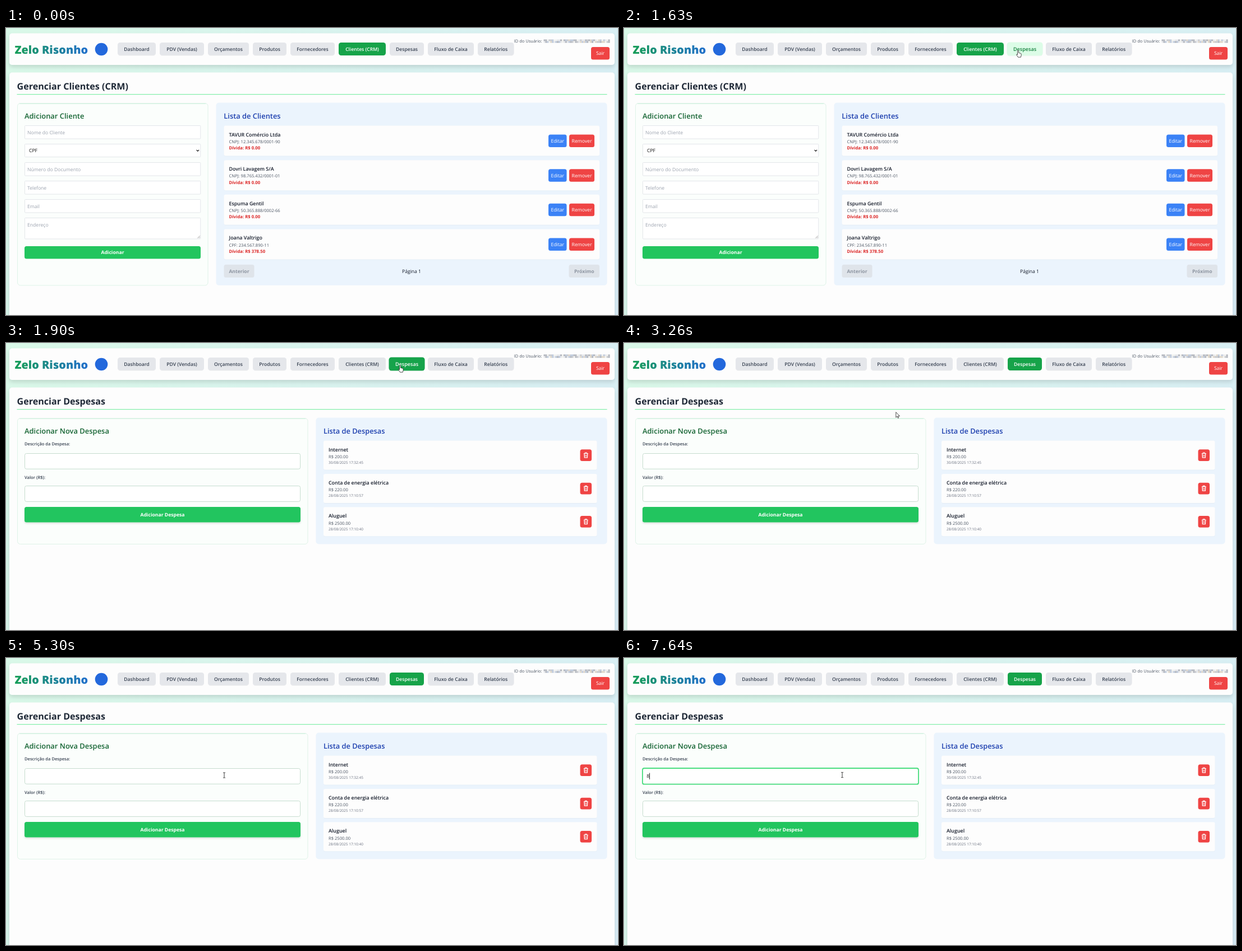
An HTML page for the animation above (8000 ms loop, 1091 by 513 pixels).

```html
<!DOCTYPE html>
<html lang="pt-BR">
<head>
<meta charset="utf-8">
<title>Gerenciar Despesas</title>
<style>
  html, body { margin: 0; width: 100%; height: 100%; overflow: hidden; }
  svg { display: block; width: 1091px; height: 513px; }
  text { font-family: "Open Sans", "Noto Sans", sans-serif; text-rendering: geometricPrecision; white-space: pre; }
</style>
</head>
<body>
<svg id="stage" viewBox="0 0 1091 513" xmlns="http://www.w3.org/2000/svg"></svg>
<script>
const LOOP = 8000;
const GRAY = [229, 231, 235], GREEN = [22, 163, 74], MINT = [220, 252, 231];
const INK = [55, 65, 81], WHITE = [255, 255, 255], LEAF = [21, 128, 61];

// Markup helpers
const box = (x, y, x2, y2, fill, r = 3, extra = "") =>
  `<rect x="${x}" y="${y}" width="${x2 - x}" height="${y2 - y}" rx="${r}" fill="${fill}" ${extra}/>`;
const label = (s, x, y, size, fill, weight = 400, anchor = "start") =>
  `<text x="${x}" y="${y}" font-size="${size}" font-weight="${weight}" fill="${fill}" text-anchor="${anchor}">${s}</text>`;
const button = (s, x, y, x2, y2, fill, weight = 400, ink = "#fff", extra = "") =>
  box(x, y, x2, y2, fill, 3.5, extra) + label(s, (x + x2) / 2, (y + y2) / 2 + 3.2, 8.6, ink, weight, "middle");
const field = (y, y2, x2, stroke, r = 1) =>
  box(33.5, y, x2, y2, "#fff", r, `stroke="${stroke}" stroke-width="1"`);

const panels = (x1, x2, bottom) =>
  box(20.5, 134.5, x1, bottom, "#fbfefc", 5, 'stroke="#def3e8"') +
  `<path d="M24 135.2H${x1 - 4}" stroke="#d9f3e5" stroke-width="1.6"/>` +
  box(x2, 133.5, 1071.5, bottom, "#ebf4fd", 5);

const heading = s => label(s, 19.5, 110, 16.1, "#1f2937", 700);

function clientsPage() {
  const hints = [["Nome do Cliente", 174.5], ["Número do Documento", 240.5], ["Telefone", 273.5], ["Email", 306.5]];
  const people = [
    ["TAVUR Comércio Ltda", "CNPJ: 12.345.678/0001-90", "0.00"],
    ["Dovri Lavagem S/A", "CNPJ: 98.765.432/0001-01", "0.00"],
    ["Espuma Gentil", "CNPJ: 50.365.888/0002-66", "0.00"],
    ["Joana Valtrigo", "CPF: 234.567.890-11", "378.50"]
  ];
  const line = "#e3e6ea", hint = "#9ca3af";
  let out = heading("Gerenciar Clientes (CRM)") + panels(360, 374.5, 460);
  out += label("Adicionar Cliente", 33, 161.5, 12.95, "#166534", 600);
  for (const [s, y] of hints) out += field(y, y + 23.5, 346.8, line) + label(s, 38, y + 15, 8.6, hint);
  out += field(207.5, 230.5, 346.8, line) + label("CPF", 41, 222.3, 8.6, "#111");
  out += '<path d="M339.6 217.9l2.2 2.3 2.2-2.3" fill="none" stroke="#111" stroke-width="1.2"/>';
  out += field(339.5, 377, 346.8, line) + label("Endereço", 38, 354.6, 8.6, hint);
  out += '<path d="M341.5 375.7l4.3-4.3M344 375.7l1.8-1.8" stroke="#777" stroke-width=".7"/>';
  out += button("Adicionar", 33, 390, 347, 412.5, "#22c55e", 700);
  out += label("Lista de Clientes", 388.3, 161.5, 12.9, "#1e40af", 600);
  people.forEach(([name, id, debt], i) => {
    const y = 174.5 + i * 61.65;
    out += box(388.5, y, 1058, y + 54, "#fdfdfd", 3, 'filter="url(#soft)"')
      + label(name, 397.5, y + 19, 8.9, "#111827", 600)
      + label(id, 397.5, y + 31.3, 7.6, "#4b5563")
      + label("Dívida: R$ " + debt, 397.5, y + 42.5, 7.75, "#dc2626", 700)
      + button("Editar", 967, y + 16, 999.5, y + 38.5, "#3b82f6")
      + button("Remover", 1004, y + 16, 1049, y + 38.5, "#ef4444");
  });
  out += button("Anterior", 388.5, 423, 442.5, 446, "#dfe4ea", 700, "#8d95a1")
    + label("Página 1", 723, 438, 8.6, "#111827", 400, "middle")
    + button("Próximo", 1003.5, 423, 1058, 446, "#dfe4ea", 700, "#8d95a1");
  return out;
}

function expensesPage() {
  const items = [
    ["Internet", "200.00", "30/08/2025 17:32:45"],
    ["Conta de energia elétrica", "220.00", "28/08/2025 17:10:57"],
    ["Aluguel", "2500.00", "28/08/2025 17:10:40"]
  ];
  const line = "#c6dccf";
  let out = heading("Gerenciar Despesas") + panels(538, 552.5, 359.5);
  out += label("Adicionar Nova Despesa", 33, 161.5, 12.95, "#166534", 600)
    + label("Descrição da Despesa:", 33, 182.7, 7.55, "#374151", 600)
    + label("Valor (R$):", 33, 243, 7.6, "#374151", 600)
    + field(197.5, 225.2, 524.6, line, 3) + field(255.5, 283.4, 524.6, line, 3)
    + box(33, 197, 525, 225.7, "none", 3, 'id="ring" stroke="#4ade80" stroke-width="1.8"')
    + '<g id="typed">' + label("8", 40.3, 214.4, 8.6, "#222") + "</g>"
    + '<path id="caret" d="M0 205.5V217" stroke="#111" stroke-width=".9"/>'
    + button("Adicionar Despesa", 33, 293, 525, 320.5, "#22c55e", 700, "#fff", 'filter="url(#lift)"');
  out += label("Lista de Despesas", 566, 161.5, 12.8, "#1e40af", 600);
  items.forEach(([name, sum, date], i) => {
    const y = 174.5 + i * 59.4;
    out += box(566, y, 1053.5, y + 52, "#fdfdfd", 3, 'filter="url(#soft)"')
      + label(name, 575, y + 19, 8.9, "#111827", 600)
      + label("R$ " + sum, 575, y + 31.2, 7.6, "#4b5563")
      + label(date, 575, y + 41.5, 6.5, "#6b7280")
      + box(1023.5, y + 15.8, 1044, y + 36.5, "#ef4444", 3.5)
      + `<g transform="translate(1033.8 ${y + 26})" fill="none" stroke="#fff">
          <path d="M-4-3H4M-1.5-3.3V-4.5H1.5V-3.3" stroke-width="1.1"/>
          <path d="M-2.9-2.6L-2.5 4.3H2.5L2.9-2.6" stroke-width="1.3"/>
          <path d="M-.9-1V2.6M.9-1V2.6" stroke-width=".8"/></g>`;
  });
  return out;
}

const NAV = [
  ["Dashboard", 199, 267], ["PDV (Vendas)", 274, 353], ["Orçamentos", 360, 433],
  ["Produtos", 440, 500], ["Fornecedores", 507, 586], ["Clientes (CRM)", 593, 677],
  ["Despesas", 684, 745], ["Fluxo de Caixa", 752, 834], ["Relatórios", 841, 905.5]
];

function navBar() {
  return NAV.map(([s, x, x2], i) =>
    `<g id="nav${i}" transform="translate(${(x + x2) / 2} 37.5)">`
    + box((x - x2) / 2, -11.5, (x2 - x) / 2, 11.5, "#e5e7eb", 4.5, 'filter="url(#soft)"')
    + label(s, 0, 3.2, 8.6, "#374151", 600, "middle") + "</g>").join("");
}

// Blurred-out identifier
function mosaic() {
  const tones = ["#c4c6cb", "#ddd3c4", "#b9c6da", "#f1f1ee", "#e4e6ea", "#aeb2ba"];
  let seed = 11, out = "";
  for (let x = 958.5; x < 1075; x += 2.95)
    for (let y = 20.5; y < 26; y += 3) {
      seed = (seed * 16807) % 2147483647;
      out += box(x, y, x + 2.95, y + 3, tones[seed % tones.length], 0);
    }
  return out;
}

const shadow = (id, dy, blur, alpha) =>
  `<filter id="${id}" x="-10%" y="-30%" width="120%" height="170%">
    <feDropShadow dx="0" dy="${dy}" stdDeviation="${blur}" flood-color="#000" flood-opacity="${alpha}"/></filter>`;
const ramp2 = (id, x2, y2, from, to) =>
  `<linearGradient id="${id}" gradientUnits="userSpaceOnUse" x1="0" y1="0" x2="${x2}" y2="${y2}">
    <stop stop-color="${from}"/><stop offset="1" stop-color="${to}"/></linearGradient>`;

document.getElementById("stage").innerHTML =
  "<defs>" + shadow("card", 4, 3.5, .12) + shadow("lift", 2, 1.5, .12) + shadow("soft", .5, .5, .06)
  + ramp2("sky", 1091, 620, "#d9f8e8", "#d8ecf7") + ramp2("brand", 182, 0, "#16a34a", "#2563eb") + "</defs>"
  + box(0, 0, 1091, 513, "url(#sky)", 0)
  + box(6, 9.5, 1085, 66, "#fdfdfd", 5, 'filter="url(#card)"')
  + box(6, 79.5, 1085, 560, "#fdfdfd", 5, 'filter="url(#card)"')
  + label("Zelo Risonho", 15.5, 45.5, 19.8, "url(#brand)", 800)
  + '<circle cx="170" cy="38" r="11.3" fill="#2368dc"/>'
  + navBar()
  + label("ID do Usuário:", 905.7, 26.3, 7.5, "#4b5563") + mosaic()
  + button("Sair", 1043, 34, 1076, 56.5, "#ef4444")
  + '<path d="M19.5 118.7H1071.5" stroke="#86efac" stroke-width="1.2"/>'
  + `<g id="clients">${clientsPage()}</g><g id="expenses">${expensesPage()}</g>`
  + `<g id="pointer" stroke-linejoin="round">
      <path id="arrow" d="M0 0V9.5L2.2 7.5 3.6 10.7 5 10.1 3.6 7H6.7Z" fill="#fff" stroke="#222" stroke-width=".8"/>
      <path id="hand" d="M-1 .9A1 1 0 0 1 1 .9V4.2L4.5 5Q5.6 5.3 5.6 6.6V9L4.8 12H0L-2.6 8Q-3.2 6.5-2 6.7L-1 7.7Z" fill="#fff" stroke="#222" stroke-width=".8"/>
      <path id="beam" d="M-2-4.6H-.6L0-4.2 .6-4.6H2M0-4.2V4.2M-2 4.6H-.6L0 4.2 .6 4.6H2" fill="none" stroke="#222" stroke-width=".9"/>
    </g>`;

const $ = id => document.getElementById(id);
const show = (id, on) => $(id).setAttribute("display", on ? "inline" : "none");
const ramp = (t, a, b) => Math.min(1, Math.max(0, (t - a) / (b - a)));
const smooth = u => u * u * (3 - 2 * u);
const mix = (a, b, u) => a.map((v, i) => v + (b[i] - v) * u);
const rgb = c => `rgb(${c.map(Math.round)})`;

// time, x, y, eased arrival
const PATH = [
  [530, 1003, 486], [1300, 702.5, 40.2, 1], [2770, 702.5, 40.2], [3260, 484.8, 123.6, 1],
  [3400, 484.8, 123.6], [4210, 507, 148, 1], [4350, 525, 153], [4480, 503, 172],
  [4700, 440, 205], [4830, 382, 220], [4900, 386, 214], [5160, 386, 214],
  [5230, 389, 209.5], [5940, 389, 209.5], [6030, 389, 209]
];

function pointerAt(t) {
  const i = PATH.findIndex(k => k[0] > t);
  if (i < 0) return PATH[PATH.length - 1].slice(1, 3);
  const a = PATH[Math.max(0, i - 1)], b = PATH[i];
  const u = ramp(t, a[0], b[0]), e = b[3] ? smooth(u) : u;
  return [a[1] + (b[1] - a[1]) * e, a[2] + (b[2] - a[2]) * e];
}

function paintNav(i, fill, ink, scale) {
  const g = $("nav" + i), [, x, x2] = NAV[i];
  g.setAttribute("transform", `translate(${(x + x2) / 2} 37.5) scale(${scale})`);
  g.firstChild.setAttribute("fill", rgb(fill));
  g.lastChild.setAttribute("fill", rgb(ink));
}

function draw(t) {
  const second = t >= 1700;
  show("clients", !second);
  show("expenses", second);

  const active = smooth(ramp(t, 1680, 1910));
  const hover = smooth(ramp(t, 1210, 1380)) - smooth(ramp(t, 2830, 2990));
  paintNav(5, mix(GREEN, GRAY, active), mix(WHITE, INK, active), 1);
  paintNav(6, mix(mix(GRAY, MINT, hover), GREEN, active),
    mix(mix(INK, LEAF, hover), WHITE, active), 1 + .05 * hover);

  const [x, y] = pointerAt(Math.floor((t - 40) / 70) * 70 + 40);
  const inside = (x1, y1, x2, y2) => x > x1 && x < x2 && y > y1 && y < y2;
  const hand = inside(684, 26, 746, 49);
  const beam = second && inside(33, 197, 525, 226);
  show("pointer", t >= 530);
  $("pointer").setAttribute("transform", `translate(${x} ${y})`);
  show("arrow", !hand && !beam);
  show("hand", hand);
  show("beam", beam);

  const typed = t >= 7640;
  $("ring").setAttribute("opacity", ramp(t, 5400, 5500));
  show("typed", typed);
  show("caret", t >= 5430 && (typed || Math.floor((t - 5430) / 532) % 2 === 0));
  $("caret").setAttribute("transform", `translate(${typed ? 45.6 : 40.5} 0)`);
}

const start = performance.now();
function tick() {
  draw((performance.now() - start) % LOOP);
  requestAnimationFrame(tick);
}
tick();
</script>
</body>
</html>
```
